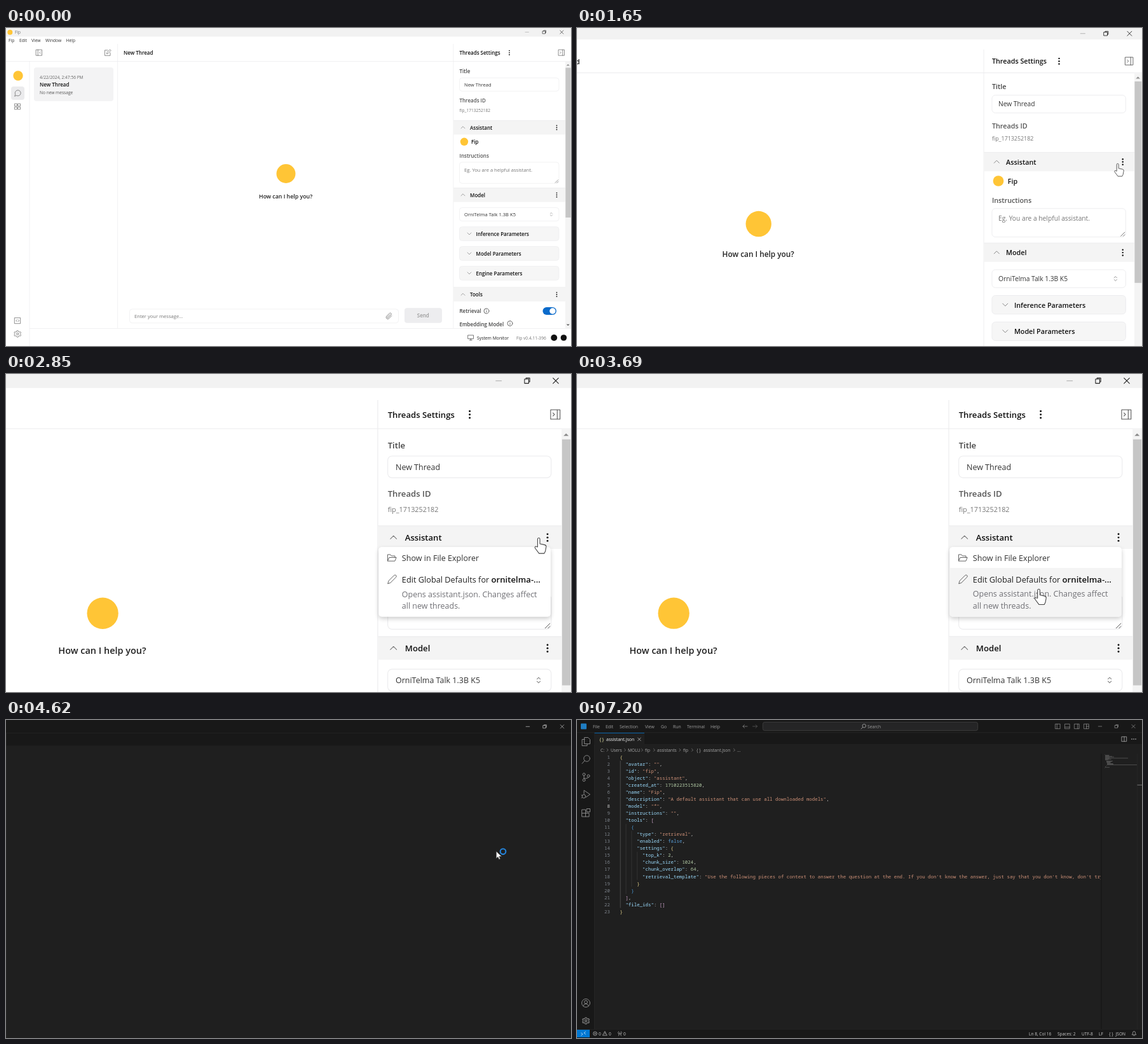
An HTML page with a canvas that plays this animation: 889x500 px, repeating every 7230 ms.

```html
<!DOCTYPE html>
<html lang="en">
<head>
<meta charset="utf-8">
<title>Edit assistant defaults</title>
<style>
html, body { margin: 0; height: 100%; overflow: hidden; background: #fff; }
canvas { display: block; width: 889px; height: 500px; }
</style>
</head>
<body>
<canvas></canvas>
<script>
const W = 889, H = 500, LOOP = 7230, MAX_ZOOM = 1.643;
const SANS = '"Open Sans", "Noto Sans", sans-serif', MONO = '"Noto Sans Mono", monospace';
const YELLOW = '#ffc536', LINE = '#ececee', SOFT = '#f4f4f4';
const canvas = document.querySelector('canvas'), c = canvas.getContext('2d');
const dpr = window.devicePixelRatio || 1;
canvas.width = W * dpr;
canvas.height = H * dpr;

// Drawing helpers; text is placed by its vertical centre.
function text(s, x, y, size = 7.6, color = '#333', weight = 400, align = 'left', family = SANS) {
  c.font = `${weight} ${size}px ${family}`;
  c.textAlign = align;
  c.fillStyle = color;
  c.fillText(s, x, y + size * 0.36);
  return c.measureText(s).width;
}
function bold(s, x, y, color = '#111', size = 8) { return text(s, x, y, size, color, 600); }
function rect(x, y, x2, y2, fill, radius = 0, border) {
  c.beginPath();
  c.roundRect(x, y, x2 - x, y2 - y, radius);
  if (fill) { c.fillStyle = fill; c.fill(); }
  if (border) { c.strokeStyle = border; c.lineWidth = 0.7; c.stroke(); }
}
function dot(x, y, r, color) {
  c.beginPath();
  c.arc(x, y, r, 0, 7);
  c.fillStyle = color;
  c.fill();
}
function icon(d, x, y, color = '#555', width = 0.65, fill) {
  const p = new Path2D(d);
  c.save();
  c.translate(x, y);
  c.lineJoin = c.lineCap = 'round';
  if (fill) { c.fillStyle = fill; c.fill(p); }
  c.strokeStyle = color;
  c.lineWidth = width;
  c.stroke(p);
  c.restore();
}
const circle = (r, x = 0, y = 0) => `M${x + r} ${y}a${r} ${r} 0 1 1 ${-2 * r} 0a${r} ${r} 0 1 1 ${2 * r} 0`;
const box = (w, h = w, x = -w / 2, y = -h / 2) => `M${x} ${y}h${w}v${h}h${-w}z`;
const UP = 'M-3 1.5L0-1.5L3 1.5', DOWN = 'M-3-1.5L0 1.5L3-1.5', NEXT = 'M-1-2L1 0L-1 2';
const GEAR = circle(1.6) + 'M-1-5h2l.5 1.5 1.5.7 1.4-.6 1 1.8-1.2 1v1.2l1.2 1-1 1.8-1.4-.6-1.5.7-.5 1.5h-2l-.5-1.5-1.5-.7-1.4.6-1-1.8 1.2-1v-1.2l-1.2-1 1-1.8 1.4.6 1.5-.7z';
const MAGNIFIER = circle(2.8, 0.8, -0.8) + 'M-1.2 1.2L-4 4';
function kebab(x, y) { for (const d of [-3.2, 0, 3.2]) dot(x, y + d, 0.9, '#111'); }
function windowButtons(xs, y, color, dim) {
  icon('M-2.7 0h5.4', xs[0], y, dim);
  icon(box(4, 4, -2.5, -1.6) + 'M-1.1-1.6v-1h3.6v3.6h-1', xs[1], y, color);
  icon('M-2.6-2.6L2.6 2.6M-2.6 2.6L2.6-2.6', xs[2], y, color);
}

const clamp = v => Math.max(0, Math.min(1, v));
const ease = v => v < 0.5 ? 4 * v ** 3 : 1 - 4 * (1 - v) ** 3;
const ramp = (t, from, to) => ease(clamp((t - from) / (to - from)));
const zoomAt = t => 1 + (MAX_ZOOM - 1) * (ramp(t, 1000, 2270) - ramp(t, 3643, 4913));

// Pointer stops: time, x, y before zooming.
const STOPS = [[810, 790, 512], [1450, 861, 159], [2000, 858, 157], [2900, 858, 157], [3450, 790, 206],
  [3950, 790, 206], [4320, 775, 200.5], [4900, 775, 200.5], [5600, 175, 133], [6400, 175, 133], [6750, 905, 300]];
function pointerAt(t) {
  const i = STOPS.findIndex(s => s[0] > t);
  if (i < 1) return null;
  const [t0, x0, y0] = STOPS[i - 1], [t1, x1, y1] = STOPS[i], k = ramp(t, t0, t1);
  return [x0 + (x1 - x0) * k, y0 + (y1 - y0) * k];
}
function drawPointer(t, [x, y]) {
  if (t > 4900) {
    icon('M-2-5.5Q0-5.5 0-4.5Q0-5.5 2-5.5M0-4.5V4.5M-2 5.5Q0 5.5 0 4.5Q0 5.5 2 5.5', x, y, '#ddd', 0.9);
  } else if (t > 1300 && t < 3900) {
    icon('M-1 8.5V1a1.1 1.1 0 0 1 2.2 0V5.5l4.6 1a1.8 1.8 0 0 1 1.4 2l-.8 4.2-1 2H.4L-3.4 9.6a1 1 0 0 1 1.4-1.4z', x, y, '#444', 0.65, '#fff');
  } else {
    icon('M0 0V10.5L2.6 8.2L4.2 12L6 11.2L4.4 7.5H8z', x, y, '#444', 0.65, '#fff');
    if (t >= 3900) icon(circle(4.2), x + 10.3, y, '#2484dc', 2);
  }
}

function section(name, y) {
  rect(704, y, 880, y + 22.4, SOFT);
  rect(704, y, 880, y + 0.6, LINE);
  icon(UP, 719, y + 11.3, '#777');
  bold(name, 730, y + 11.7);
  kebab(866.5, y + 11.5);
}
function settingsPanel() {
  bold('Threads Settings', 713.5, 39);
  kebab(792, 38.8);
  icon(box(9) + 'M1.8-4.5v9M-2.3-1.5L-.8 0L-2.3 1.5', 874, 38.7);
  c.save();
  c.beginPath();
  c.rect(704, 53, 185, 419);
  c.clip();
  rect(880, 53, 889, 472, SOFT);
  rect(880.4, 62.5, 888.5, 298, '#c6c6c6');
  icon('M-2 1L0-1L2 1z', 884.3, 58, '#888', 0.3, '#888');
  icon('M-2-1L0 1L2-1z', 884.3, 467, '#555', 0.3, '#555');
  bold('Title', 713.5, 68.3, '#444');
  rect(713.5, 78.5, 870, 99.3, '#fff', 4, LINE);
  text('New Thread', 721, 89);
  bold('Threads ID', 713.5, 114.5, '#555');
  text('fip_1713252182', 713.5, 129.5, 6.6, '#777');
  section('Assistant', 145);
  dot(721, 178.8, 6.2, YELLOW);
  bold('Fip', 732, 179.5);
  bold('Instructions', 713.5, 201.3, '#555');
  rect(713.5, 211, 870, 244.3, '#fff', 4, LINE);
  text('Eg. You are a helpful assistant.', 721, 222.8, 7.6, '#777');
  icon('M-2.3 2.3L2.3-2.3M.5 2.3L2.3.5', 866.5, 241, '#555', 0.6);
  section('Model', 251);
  rect(713.5, 282.5, 870, 303.5, '#fff', 4, LINE);
  text('OrniTelma Talk 1.3B K5', 721, 293.2);
  icon('M-1.6-1L0-2.6L1.6-1M-1.6 1L0 2.6L1.6 1', 858, 293, '#888');
  ['Inference', 'Model', 'Engine'].forEach((name, i) => {
    const y = 323.5 + 31 * i;
    rect(713.5, y - 10.9, 870, y + 10.9, '#f6f6f6', 4, LINE);
    icon(DOWN, 729, y, '#777');
    bold(name + ' Parameters', 739.5, y + 0.5);
  });
  section('Tools', 407.5);
  bold('Retrieval', 713.5, 445, '#444');
  bold('Embedding Model', 713.5, 465.7, '#444');
  for (const [x, y] of [[756, 445], [793, 464.5]]) icon(circle(4) + 'M0-.2v2M0-2v.1', x, y, '#444', 0.8);
  rect(844.5, 439, 866, 451, '#0b6bcb', 6);
  dot(860, 445, 4.7, '#fff');
  c.restore();
}
function contextMenu(pointerY) {
  c.save();
  c.shadowColor = 'rgba(0,0,0,.2)';
  c.shadowBlur = 7 * dpr;
  c.shadowOffsetY = 3 * dpr;
  rect(704.8, 165.5, 869.5, 232.3, '#fff', 3);
  c.restore();
  if (pointerY > 185.7) rect(704.8, 185.7, 869.5, 232.3, SOFT, [0, 0, 3, 3]);
  else if (pointerY > 165.5) rect(704.8, 165.5, 869.5, 185.7, SOFT, [3, 3, 0, 0]);
  icon('M-4 3V-3h2.6l1 1.3h3.4V-.2M-4 3l1.5-3.2h6.8L3 3z', 717.4, 175.8, '#555', 0.55);
  text('Show in File Explorer', 727, 175.9, 7.65);
  icon('M-4 4l.8-2.6L2-3.8q1-.8 1.8 0t0 1.8L-1.4 3.2z', 717.6, 196.5, '#555', 0.55);
  const w = text('Edit Global Defaults for ', 727, 196.6, 7.75, '#222', 500);
  bold('ornitelma-...', 727 + w, 196.6);
  text('Opens assistant.json. Changes affect', 727, 210.6, 7.6, '#707075');
  text('all new threads.', 727, 222.1, 7.6, '#707075');
}
function chatApp() {
  rect(0, 0, W, H, '#fff');
  rect(0, 0, W, 13.4, '#f2f2f2');
  dot(6.3, 6.8, 4, YELLOW);
  text('Fip', 14, 6.8, 6.6, '#777');
  windowButtons([819.7, 847, 874.4], 6.5, '#222', '#aaa');
  [['Fip', 4], ['Edit', 21], ['View', 40], ['Window', 62], ['Help', 94.5]].forEach(([s, x]) => text(s, x, 19.3, 6.7));

  rect(0, 52, W, 52.7, LINE);
  rect(37, 472.2, W, 472.9, LINE);
  rect(36.7, 52, 37.4, H, LINE);
  rect(175.4, 25, 176.1, 472, LINE);
  rect(703.6, 25, 704.3, 472, LINE);
  icon(box(9) + 'M-1.8-4.5v9M2.3-1.5L.8 0L2.3 1.5', 52, 38.7);
  icon('M0-4h-4.5v8.5h8.5V0M-1.5 1.5l.4-2L3.6-5l1.5 1.5L.5 1.1z', 160, 38.9);
  bold('New Thread', 185, 39.2);

  dot(19, 75, 7.7, YELLOW);
  rect(8, 92, 29, 113, '#ebebed', 4);
  icon('M-4.5 4.5l.8-2.8a4.5 4.5 0 1 1 1.8 2z', 18.3, 102.5);
  for (const x of [-2.6, 2.6]) for (const y of [-2.6, 2.6]) icon(box(3.6), 18.2 + x, 123.5 + y);
  icon(box(9) + 'M-1-1.5L-2.5 0L-1 1.5M1-1.5L2.5 0L1 1.5', 18.2, 460.2);
  icon(GEAR, 18.2, 481);

  rect(44, 62, 169, 115, '#f3f3f4', 4);
  text('4/22/2024, 2:47:56 PM', 53, 77.2, 6.6, '#666');
  bold('New Thread', 53, 89.5);
  text('No new message', 53, 101.7, 6.6, '#555');

  dot(440.5, 229, 15, YELLOW);
  text('How can I help you?', 440.1, 264.5, 8.8, '#222', 600, 'center');
  rect(194.5, 442, 617.5, 463.8, '#fff', 4, LINE);
  text('Enter your message...', 202, 453, 7.6, '#777');
  icon('M4-.5L-.2 3.8a2.6 2.6 0 0 1-3.7-3.7L.5-4.4a1.7 1.7 0 0 1 2.5 2.5L-1.4 2.5a.8.8 0 0 1-1.2-1.2L1.3-2.6', 602.8, 453);
  rect(627, 440.3, 686, 463.8, '#ededef', 4);
  text('Send', 656.3, 452.5, 8, '#999', 600, 'center');

  icon(box(8.5, 5.6, -4.25, -4) + 'M0 1.6v2.2M-2 3.8h4', 731.3, 487, '#333');
  text('System Monitor', 741, 487.3, 6.8, '#222', 500);
  text('Fip v0.4.11-396', 803, 487.3, 6.7, '#777');
  dot(862.3, 487, 5, '#111');
  dot(877.5, 487, 4.8, '#111');
  settingsPanel();
}

const CODE = `{
  "avatar": "",
  "id": "fip",
  "object": "assistant",
  "created_at": 1710223515820,
  "name": "Fip",
  "description": "A default assistant that can use all downloaded models",
  "model": "*",
  "instructions": "",
  "tools": [
    {
      "type": "retrieval",
      "enabled": false,
      "settings": {
        "top_k": 2,
        "chunk_size": 1024,
        "chunk_overlap": 64,
        "retrieval_template": "Use the following pieces of context to answer the question at the end. If you don't know the answer, just say that you don't know, don't try to make up"
      }
    }
  ],
  "file_ids": []
}`.split('\n');
const CHAR = 4.45, CODE_X = 67.5, lineY = n => 58.5 + 11.02 * (n - 1);
const BRACKETS = ['#e3d28a', '#c79fc5', '#4a9ad6'];

function code(activeLine, caretOn, focused) {
  for (const [col, from, to] of [[0, 2, 22], [2, 11, 20], [4, 12, 19], [6, 15, 18]]) {
    const x = CODE_X + col * CHAR;
    rect(x + 0.3, lineY(from) - 5.5, x + 1, lineY(to) + 5.5, col ? '#3c3c3c' : '#5c5c5c');
  }
  c.save();
  c.beginPath();
  c.rect(28, 50, 797, 436);
  c.clip();
  let depth = 0;
  CODE.forEach((line, i) => {
    const y = lineY(i + 1);
    text(i + 1, 52, y, CHAR / 0.6, i + 1 === activeLine ? '#ccc' : '#7c828a', 400, 'right', MONO);
    for (const m of line.matchAll(/"[^"]*"|\d+|false|\S/g)) {
      const s = m[0];
      let color = '#ccc';
      if (s[0] === '"') color = line[m.index + s.length] === ':' ? '#9cdcfe' : '#ce9178';
      else if (/\d/.test(s)) color = '#b5cea8';
      else if (s === 'false') color = '#569cd6';
      else if (/[{[]/.test(s)) color = BRACKETS[depth++ % 3];
      else if (/[}\]]/.test(s)) color = BRACKETS[--depth % 3];
      text(s, CODE_X + m.index * CHAR, y, CHAR / 0.6, color, 400, 'left', MONO);
    }
  });
  c.restore();
  if (focused) for (const n of [1, 23]) rect(67.5, lineY(n) - 5, 72, lineY(n) + 5, null, 0, '#888');
  if (caretOn) {
    const x = CODE_X + CODE[activeLine - 1].length * CHAR;
    rect(x - 0.4, lineY(activeLine) - 5.5, x + 0.7, lineY(activeLine) + 5.5, '#ccc');
  }
  CODE.forEach((line, i) => {
    const indent = line.search(/\S/), y = 54 + i * 0.95;
    rect(830 + indent * 0.5, y, Math.min(881, 830 + line.length * 0.5), y + 0.5, '#777');
  });
}
function editor(t) {
  const loaded = t > 4860, focused = t < 7140, clicked = t >= 5790;
  const titleColor = focused ? '#ccc' : '#9d9d9d', mute = '#868686';
  rect(0, 0, W, H, '#1f1f1f');
  rect(0, 0, W, 39, '#181818');
  rect(0, 20, 27, H, '#181818');
  rect(0, 486, W, H, '#181818');
  rect(0, 19.6, W, 20.2, '#2b2b2b');
  rect(27, 20, 27.6, 486, '#2b2b2b');
  rect(0, 486, W, 486.6, '#2b2b2b');
  windowButtons([823, 849, 875.5], 10, titleColor, titleColor);
  if (!loaded) return;

  rect(6, 5.5, 15, 14.5, focused ? '#2596e8' : '#1f7dc2', 1);
  [['File', 25], ['Edit', 45], ['Selection', 67], ['View', 107], ['Go', 132], ['Run', 151], ['Terminal', 173], ['Help', 210]]
    .forEach(([s, x]) => text(s, x, 10.3, 6.9, titleColor));
  icon('M3.5 0h-7M-1-2.5L-3.5 0L-1 2.5', 264.5, 10, titleColor);
  icon('M-3.5 0h7M1-2.5L3.5 0L1 2.5', 280, 10, '#666');
  rect(292.4, 3.4, 630.6, 16.6, '#252526', 3, '#484848');
  icon(MAGNIFIER, 451, 10, titleColor, 0.9);
  text('Search', 457, 10.2, 6.7, titleColor);
  ['M-1.3-3.7v7.4', 'M-3.7 1.2h7.4', 'M1.3-3.7v7.4', 'M0-3.7v7.4M0 0h3.7'].forEach((d, i) =>
    icon(box(7.4) + d, 756.5 + 15 * i, 10, titleColor));

  rect(27.6, 20, 106, 39, '#1f1f1f');
  rect(27.6, 20, 106, 20.8, '#0078d4');
  rect(106, 38.5, W, 39, '#2b2b2b');
  text('{ }', 35.5, 30.3, 6.5, '#d5d39a', 600);
  text('assistant.json', 46, 30.3, 7, '#fff');
  icon('M-2.3-2.3L2.3 2.3M-2.3 2.3L2.3-2.3', 98, 30.3, '#ddd');
  icon(box(7.4) + 'M0-3.7v7.4', 861, 30, '#ccc');
  for (const d of [-3, 0, 3]) dot(876 + d, 30, 0.8, '#ccc');
  [['C:', 37], ['Users', 53], ['MOLU', 80], ['fip', 107], ['assistants', 126], ['fip', 167], ['{ }', 188], ['assistant.json', 199], ['...', 252]]
    .forEach(([s, x]) => text(s, x, 47.3, 6.7, '#a9a9a9'));
  for (const x of [48, 75.5, 102.5, 121.5, 162, 181.5, 247.5]) icon(NEXT, x, 47.2, '#999');

  icon('M-2-6.5h5.5l3 3V3.5H-2zM-2-3.5h-4V6.5h8V3.5', 14, 34, mute, 1);
  icon(circle(4.8, 1.5, -1.5) + 'M-2 2L-6 6.5', 14, 62, mute, 1);
  icon(circle(2, -3, -4.5) + circle(2, -3, 4.5) + circle(2, 4, -2) + 'M-3-2.5v5M4 0Q4 2-3 2', 14, 90, mute, 1);
  icon('M-3-1V-6.5L6.5 0L0 4.5' + circle(2.8, -3.2, 3) + 'M-7 1l1.5 1M-7 5.5l1.5-1', 14, 117, mute, 1);
  icon(box(5.5, 11, -6, -5) + 'M-6 .5h11v5.5h-5.5' + box(5, 5, 1.5, -6.5), 14, 146, mute, 1);
  icon(circle(6.5) + circle(2.5, 0, -1.5) + 'M-4.3 4.8q1-3.5 4.3-3.5t4.3 3.5', 14, 445, mute, 1);
  icon(GEAR, 14, 473, mute, 1.1);

  const activeLine = clicked ? 8 : 21;
  const blink = Math.floor((t - (clicked ? 5790 : 4860)) / 500) % 2 === 0;
  code(activeLine, focused && blink, focused);
  rect(824, 53, 826, 486, '#191919');
  rect(881, 53, 881.5, 486, '#2b2b2b');
  c.globalAlpha = clamp((t - 5600) / 100) * (1 - clamp((t - 6750) / 350));
  rect(881.5, 53, W, 331, '#484848');
  rect(67, 480, 484, 487, '#434343');
  c.globalAlpha = 1;
  rect(881.5, 101.7, W, 102.7, '#777');

  rect(0, 487, 20, 499, '#0078d4');
  icon('M-3.5-1L-1 1L-3.5 3M3.5-3L1-1L3.5 1', 10, 493, '#fff');
  icon(circle(3) + 'M-1.2-1.2L1.2 1.2M-1.2 1.2L1.2-1.2', 28.5, 493, '#ccc');
  icon('M0-3L3.3 3h-6.6zM0-1v1.8', 44, 492.8, '#ccc');
  icon('M0-1L-2 3.5M0-1L2 3.5M-2-3q-2 2 0 4M2-3q2 2 0 4', 67.5, 492.8, '#ccc');
  [['0', 34], ['0', 50], ['0', 73], [t < 5900 ? 'Ln 21, Col 5' : 'Ln 8, Col 16', 711], ['Spaces: 2', 756],
    ['UTF-8', 794], ['LF', 821], ['{ }', 837], ['JSON', 847.5]].forEach(([s, x]) => text(s, x, 493.2, 6.6, '#ccc'));
  icon('M-3 2Q-2 1-2-1a2 2 0 0 1 4 0Q2 1 3 2zM-.8 3.4h1.6', 876.5, 492.6, '#ccc');
}

function draw(now) {
  const t = now % LOOP, z = zoomAt(t), pointer = pointerAt(t);
  // Zoom is anchored to the top right corner.
  c.setTransform(z * dpr, 0, 0, z * dpr, W * (1 - z) * dpr, 0);
  if (t < 4500) {
    chatApp();
    if (t >= 1950 && t < 3900) contextMenu(pointer[1]);
  } else {
    editor(t);
  }
  if (pointer) drawPointer(t, pointer);
  requestAnimationFrame(draw);
}
requestAnimationFrame(draw);
</script>
</body>
</html>
```
